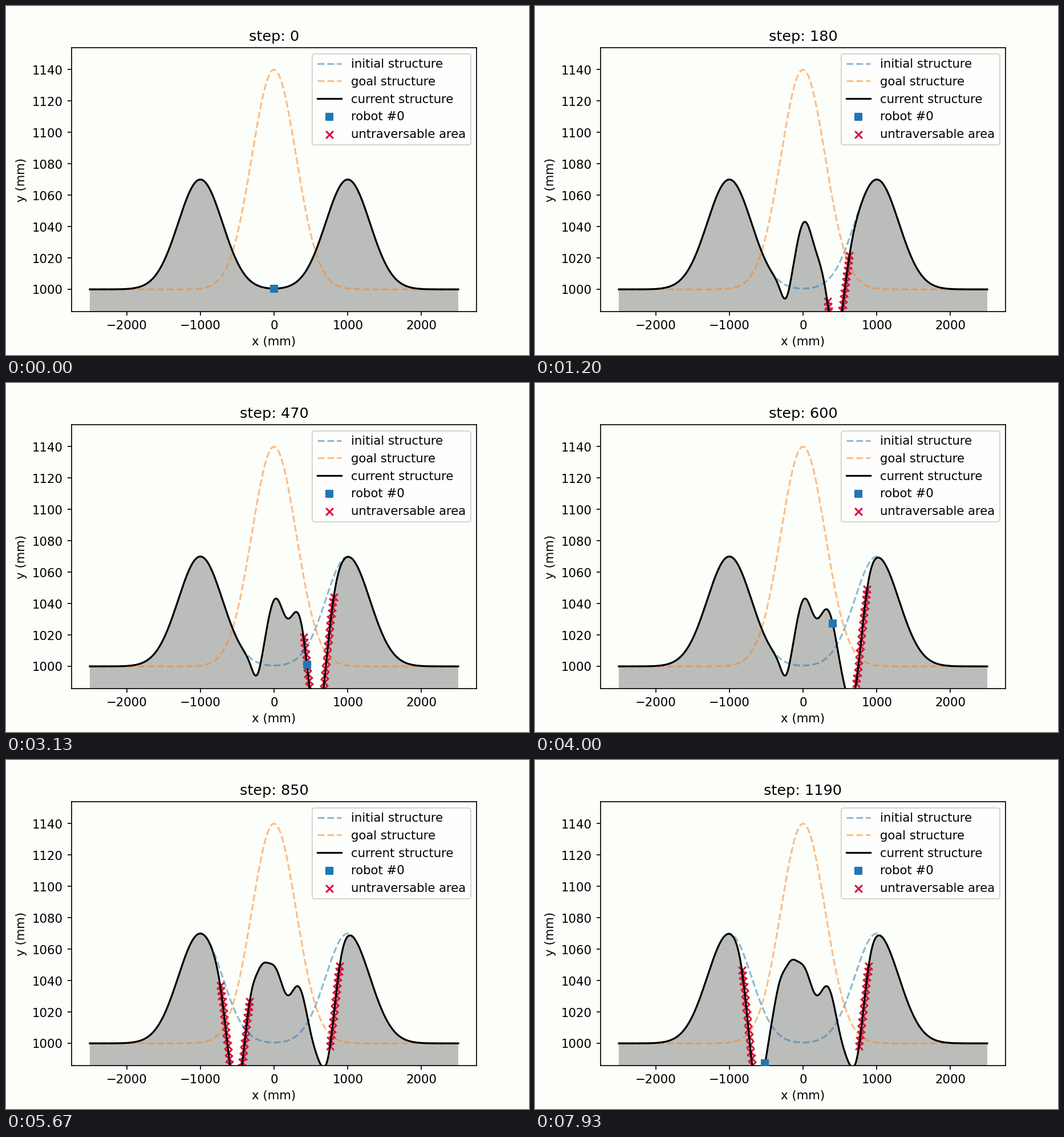
Animation of 917 by 611 pixels, one loop 8 s. Source, as a matplotlib script:

```python
import numpy as np
import matplotlib.pyplot as plt
from matplotlib.animation import FuncAnimation

FRAMES = 120
INTERVAL = 66.57      # ms
STEEP = 0.3           # slope from which the ground cannot be crossed
PAPER = "#fcfefa"
x = np.arange(-2500, 2501, 10.0)


def bell(mid, width, height):
    return height * np.exp(-((x - mid) / width) ** 2 / 2)


start = 1000 + bell(-1000, 300, 70) + bell(1000, 300, 70)
target = 1000 + bell(0, 300, 140)

# soil piled up or taken away on the spot: centre, width, height, first, last step
HEAPS = [
    (-235, 65, -12, 0, 50),
    (20, 115, 42, 20, 170),
    (325, 110, 31, 80, 180),
    (550, 100, -17, 180, 350),
    (-228, 115, 54, 660, 860),
]

# pits that wander outwards: step, centre, width, depth
RIGHT_PIT = [(40, 400, 115, 0), (180, 420, 115, 62), (350, 532, 130, 48),
             (600, 700, 105, 53), (660, 728, 105, 53)]
LEFT_PIT = [(660, -450, 110, 0), (850, -530, 110, 52), (1030, -635, 110, 62)]

# turning points of the robot: step, x
TRIPS = [(0, 0), (40, -235), (90, 20), (180, 420), (265, 325), (350, 532),
         (435, 325), (520, 620), (600, 402), (630, 325), (740, -225),
         (850, -530), (910, -225), (970, -580), (1030, -230), (1130, -635),
         (1190, -515)]


def at(step, keys):
    times, *tracks = zip(*keys)
    return [np.interp(step, times, track) for track in tracks]


def ground(step):
    y = start.copy()
    for mid, width, height, first, last in HEAPS:
        y += bell(mid, width, height * np.interp(step, (first, last), (0, 1)))
    for pit in (LEFT_PIT, RIGHT_PIT):
        y -= bell(*at(step, pit))
    return y


fig = plt.figure(figsize=(6, 4), dpi=152.84, facecolor=PAPER)
ax = fig.add_axes([0.125, 0.125, 0.775, 0.755], facecolor=PAPER)
ax.set(xlim=(-2750, 2750), ylim=(986, 1154), xlabel="x (mm)", ylabel="y (mm)")
title = ax.set_title("step: 0")

soil, = ax.fill(x, start, fc="#bbbdbb", lw=0)
initial, = ax.plot(x, start, "--", color="C0", alpha=0.5,
                   label="initial structure")
goal, = ax.plot(x, target, "--", color="C1", alpha=0.5, label="goal structure")
current, = ax.plot(x, start, color="black", label="current structure")
robot = ax.scatter([], [], marker="s", color="C0", zorder=3, label="robot #0")
steep = ax.scatter([], [], marker="x", color="crimson",
                   label="untraversable area")
ax.legend(handles=[initial, goal, current, robot, steep], loc="upper right")


def draw(frame):
    step = 10 * frame
    y = ground(step)
    title.set_text(f"step: {step}")
    current.set_ydata(y)
    soil.set_xy(np.column_stack([np.r_[x, 2500, -2500], np.r_[y, 900, 900]]))
    bad = np.abs(np.gradient(y, x)) > STEEP
    steep.set_offsets(np.column_stack([x[bad], y[bad]]))
    rx, = at(step, TRIPS)
    robot.set_offsets([[rx, np.interp(rx, x, y)]])
    return title, current, soil, steep, robot


anim = FuncAnimation(fig, draw, frames=FRAMES, interval=INTERVAL,
                     init_func=lambda: draw(0), repeat=True, repeat_delay=0)
plt.show()
```
